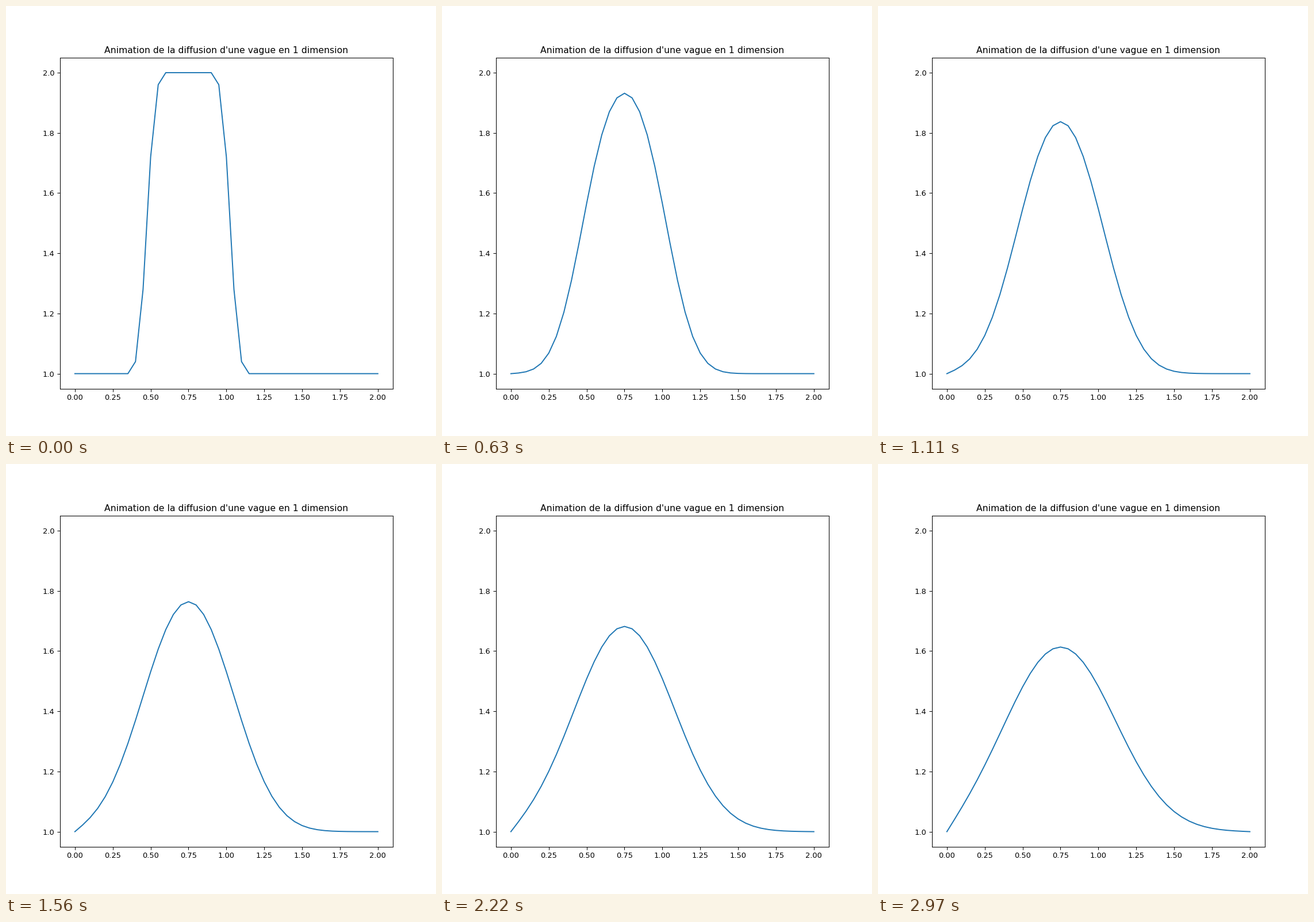
Recreate the animation shown at these times as a matplotlib script. Size 748 by 748 pixels, loop 3000 ms.

```python
import numpy as np
import matplotlib.pyplot as plt
from matplotlib.animation import FuncAnimation

N_FRAMES = 100
INTERVAL = 30   # ms
SIGMA = 0.2     # nu * dt / dx**2
LEAD = 2        # diffusion steps already done at the start

x = np.linspace(0, 2, 41)


def diffuse(u):
    """One explicit diffusion step with fixed ends."""
    new = u.copy()
    new[1:-1] += SIGMA * (u[2:] - 2 * u[1:-1] + u[:-2])
    return new


def solve(steps):
    u = np.ones_like(x)
    u[10:21] = 2    # square wave on 0.5 <= x <= 1
    states = [u]
    for _ in range(steps):
        states.append(diffuse(states[-1]))
    return states


states = solve(N_FRAMES + LEAD)

fig, ax = plt.subplots(figsize=(8, 8), dpi=93.5)
line, = ax.plot(x, states[0], color="C0", lw=1.5)
ax.set_xlim(-0.1, 2.1)
ax.set_ylim(0.95, 2.05)
ax.set_title("Animation de la diffusion d'une vague en 1 dimension")


def update(i):
    line.set_ydata(states[i + LEAD])
    return line,


anim = FuncAnimation(fig, update, frames=N_FRAMES, interval=INTERVAL,
                     repeat=True, repeat_delay=0)
plt.show()
```
